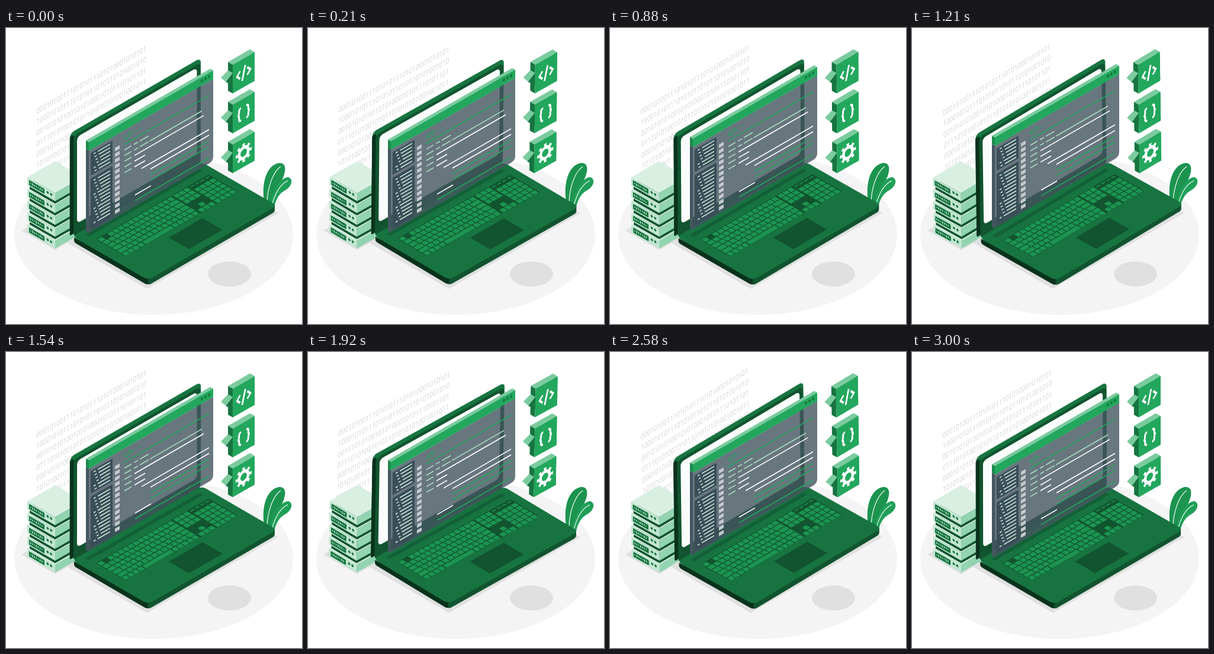
Animation, 500 px wide and 500 px high, one loop 3.04 s. Source, as an HTML page:

```html
<!DOCTYPE html>
<html>
<head>
<meta charset="utf-8">
<style>
html, body { margin: 0; width: 100%; height: 100%; overflow: hidden; background: #fff }
svg { display: block; width: 100vw; height: 100vh }
text { font: 13px Roboto, sans-serif; fill: #d8d8d8 }
</style>
</head>
<body>
<svg id="stage" viewBox="0 0 500 500"></svg>
<script>
const G = '#22a75d', KEY = '#1c9450', MID = '#177440', DARK = '#11542f', DEEP = '#0a321c';
const LIGHT = '#7acb9e', PALE = '#a7dcbe', MINT = '#d8efe2', GREY = '#e0e0e0', SLATE = '#44565f';
const ISO = .577;

const range = (from, to) => Array.from({ length: to - from + 1 }, (_, i) => from + i);
const each = (from, to, fn) => range(from, to).map(fn).join('');
const poly = (points, fill) => `<polygon points="${points}" fill="${fill}"/>`;
const path = (d, fill) => `<path d="${d}" fill="${fill}"/>`;
const line = (d, color, width) => `<path d="${d}" fill="none" stroke="${color}" stroke-width="${width}"/>`;
const rect = (x, y, w, h, fill, r = 0) => `<rect x="${x}" y="${y}" width="${w}" height="${h}" fill="${fill}" rx="${r}"/>`;
const oval = (x, y, rx, ry, fill) => `<ellipse cx="${x}" cy="${y}" rx="${rx}" ry="${ry}" fill="${fill}"/>`;
const group = (transform, body) => `<g transform="${transform}">${body}</g>`;
const part = (id, body) => `<g id="${id}">${body}</g>`;

// isometric planes: upright facing right, upright facing left, and lying flat
const wall = (x, y, body) => group(`matrix(1 ${-ISO} 0 1 ${x} ${y})`, body);
const side = (x, y, body) => group(`matrix(1 ${ISO} 0 1 ${x} ${y})`, body);
const floor = (x, y, body) => group(`matrix(1 ${-ISO} 1 ${ISO} ${x} ${y})`, body);

// box whose top has its left corner at x, y
const block = (x, y, w, d, h, top, left, right) =>
  floor(x, y, rect(0, 0, d, w, top)) + side(x, y, rect(0, 0, w, h, left))
  + wall(x + w, y + w * ISO, rect(0, 0, d, h, right));

function ground() {
  return oval(249.5, 349, 235.5, 135.5, '#f4f4f4')
    + floor(26, 342, rect(0, 0, 57, 57, GREY))
    + floor(100, 361, rect(0, 0, 222, 138, GREY))
    + oval(377.5, 415.5, 36.5, 21.2, GREY);
}

function plant() {
  return path('M437 300C430 262 440 232 461 228C479 227 471 253 458 270C450 281 449 291 448 302Z', KEY)
    + path('M447 302C451 270 464 253 477 252C487 256 482 269 470 275C460 281 455 292 453 303Z', '#1f9f58')
    + line('M441 298C441 268 452 242 464 234M449 300C455 277 465 263 476 258', '#fff', 1.1);
}

function digits() {
  const rows = [
    '000101001110101011101010001010101', '100010101110101011010110101001010',
    '001010101001010100010101110101101', '011101010010101101010101001001011',
    '000101010010110100101111010010101', '101010010110100101101001010110101'
  ];
  return each(0, 6, i => group(`matrix(.77 ${-.77 * ISO} 0 1 51.5 ${145.5 + 18.3 * i})`,
    `<text>${rows[i % 6]}</text>`));
}

function servers() {
  const front = i => rect(3, 3, 26, 8.6, MID, 1)
    + each(0, 6, k => {
      const h = 1.5 + (k * 3 + i * 2) % 4 * .8;
      return rect(5 + k * 3.2, 7.3 - h / 2, 1.3, h, MINT);
    })
    + oval(34.4, 6, 1.9, 2.1, MID) + oval(40.2, 6, 1.9, 2.1, MID);
  return each(0, 4, k => {
    const y = 332 - 20 * k;
    const gap = k ? block(40, y + 10, 43, 43, 10, DARK, DARK, DARK) : '';
    return gap + block(36, y, 47, 47, 13.5, MINT, '#c2e6d2', '#93d4b0') + side(36, y, front(k));
  });
}

function keyboard() {
  const STEP = 8.4;
  const key = (a, row, w = 7.2, h = 7) => rect(a, 1 + row * 8.3, w, h, KEY, .6);
  const run = (a, count, row) => each(0, count - 1, k => key(a + k * STEP, row));
  const main = row => {
    const first = 7.2 + row * 1.6, last = 1 + first + 12 * STEP + 1.2;
    return key(1, row, first) + run(first + 2.2, 12, row) + key(last, row, 126 - last);
  };
  return rect(0, 0, 190, 50, DARK, 2)
    + key(1, 0) + run(17.8, 13, 0)
    + each(1, 4, main)
    + run(1, 4, 5) + key(35, 5, 48) + run(84.5, 5, 5)
    + each(0, 2, row => run(129, 3, row))
    + key(129 + STEP, 4) + run(129, 3, 5)
    + each(1, 5, row => run(156, 4, row))
    + each(0, 3, k => key(156 + k * STEP, .2, 6.2, 1.8));
}

function laptop() {
  const screen = wall(108, 178, rect(0, 0, 221, 173, MID, 7) + rect(-.3, 6, 7, 167, DEEP, 3))
    + wall(114, 182, rect(0, 0, 214.5, 172, DARK, 7))
    + wall(120, 184, rect(0, 0, 202.5, 146, '#fafcfb', 6));
  const base = path('M115 354V360Q116 363 120 365L235 432Q240 434 245 432V420Z', DEEP)
    + path('M240 420V433Q243 433 246 431.500L450 313Q454 311 454 307V299Z', DARK)
    + floor(112, 352, rect(0, 0, 218, 128, MID, 7));
  return screen + base
    + floor(134, 349, rect(0, 0, 193, 6, '#136038'))
    + floor(152, 357, keyboard())
    + floor(275, 354, rect(0, 0, 57, 34, DARK));
}

function panel() {
  const rowY = k => 38 + 9.6 * k;
  const row = (k, a, b, color) => line(`M${a} ${rowY(k)}H${b}`, color, 1.9);

  const outline = (top, count) => each(0, count - 1, i => {
    const y = top + 6 * i, indent = i * 5 % 4 * 1.7;
    return line(`M${8 + indent} ${y}h3.500M${15 + indent} ${y}H36`, '#cfeedd', 1.8);
  });
  const sidebar = rect(3, 20, 37, 38, '#3a4e59', 1.5) + outline(24, 6)
    + rect(3, 63, 37, 86, '#3a4e59', 1.5) + outline(69, 13);

  const code = line('M64 23L60 27L64 31M70 23L74 27L70 31M68.500 21L65.500 33M78 27H81M84 27H87', G, 1.4)
    + row(0, 59, 203, G)
    + each(1, 5, k => row(k, 60, 72, PALE))
    + each(1, 2, k => row(k, 76, 83, PALE) + row(k, 86, 101, PALE))
    + row(2, 103, 191, PALE) + row(3, 77, 194, '#fff')
    + each(4, 5, k => row(k, 77, 95, '#fff'))
    + each(6, 9, k => row(k, k == 6 ? 89 : 104, 203, k < 8 ? '#fff' : G))
    + row(10, 78, 105, '#fff') + row(11, 78, 203, G);

  const header = rect(0, 0, 210, 14, G) + each(0, 2, k => oval(191 + 6 * k, 6.3, 1.9, 2.6, MID));
  const body = `<g opacity=".8">${path('M0 14H210V146Q210 153 203 153H0Z', SLATE)}</g>`;
  return side(135, 204, rect(0, 0, 5, 140, SLATE))
    + wall(140, 193, body + sidebar + each(0, 11, k => rect(44, rowY(k) - 3, 8, 6, '#c3c9ce')) + code)
    + block(135, 190, 5, 210, 14, LIGHT, '#1b8a4c', G)
    + wall(140, 193, header);
}

function icons() {
  const brace = line('M-5 -10.500Q-9 -10.500 -9 -6.500V-4Q-9 0 -12 0Q-9 0 -9 4V6.500Q-9 10.500 -5 10.500', '#fff', 3.4);
  const ring = (r, width, dash = '') => `<circle r="${r}" fill="none" stroke="#fff" stroke-width="${width}" ${dash}/>`;
  const glyphs = [
    line('M-7 -6.500L-13 0L-7 6.500M7 -6.500L13 0L7 6.500M3 -12L-3 12', '#fff', 3.4),
    brace + group('scale(-1 1)', brace),
    ring(9, 5.4) + ring(13.3, 4.8, 'pathLength="16" stroke-dasharray=".9 1.1" stroke-dashoffset=".45"')
  ];
  return each(0, 2, i => group(`translate(0 ${67.4 * i})`,
    block(375, 57.4, 8, 37, 48.5, LIGHT, MID, G)
    + wall(383, 62, rect(30, 0, 7, 48.5, G, 1))
    + poly('371,91 383,76 383,97', MID)
    + poly('363,84 375,71.500 383,76 371.500,91', LIGHT)
    + wall(401.5, 76, group('scale(.866 1)', glyphs[i]))));
}

const stage = document.getElementById('stage');
stage.innerHTML = ground() + plant() + part('digits', digits()) + part('servers', servers())
  + part('laptop', laptop()) + part('panel', panel()) + part('icons', icons());

const LOOP = 3040;
// pivot, clockwise and counter-clockwise swing in degrees
const swings = {
  digits: ['145 133', 2, 2.5], servers: ['83 298', 1, 1],
  laptop: ['281 243', 1, 1], icons: ['392 141', 1, 1]
};
const move = (id, value) => document.getElementById(id).setAttribute('transform', value);

function swing(p, right, left) {
  if (p < .25) return right * p * 4;
  if (p < .75) return right - (right + left) * (p - .25) * 2;
  return left * (p - 1) * 4;
}

function draw(now) {
  const t = now % LOOP / LOOP;
  move('panel', `translate(0 ${-10 * (1 - Math.abs(1 - 2 * t))})`);
  for (const [id, [pivot, right, left]] of Object.entries(swings))
    move(id, `rotate(${swing(t * 2 % 1, right, left)} ${pivot})`);
  requestAnimationFrame(draw);
}
draw(performance.now());
</script>
</body>
</html>
```
